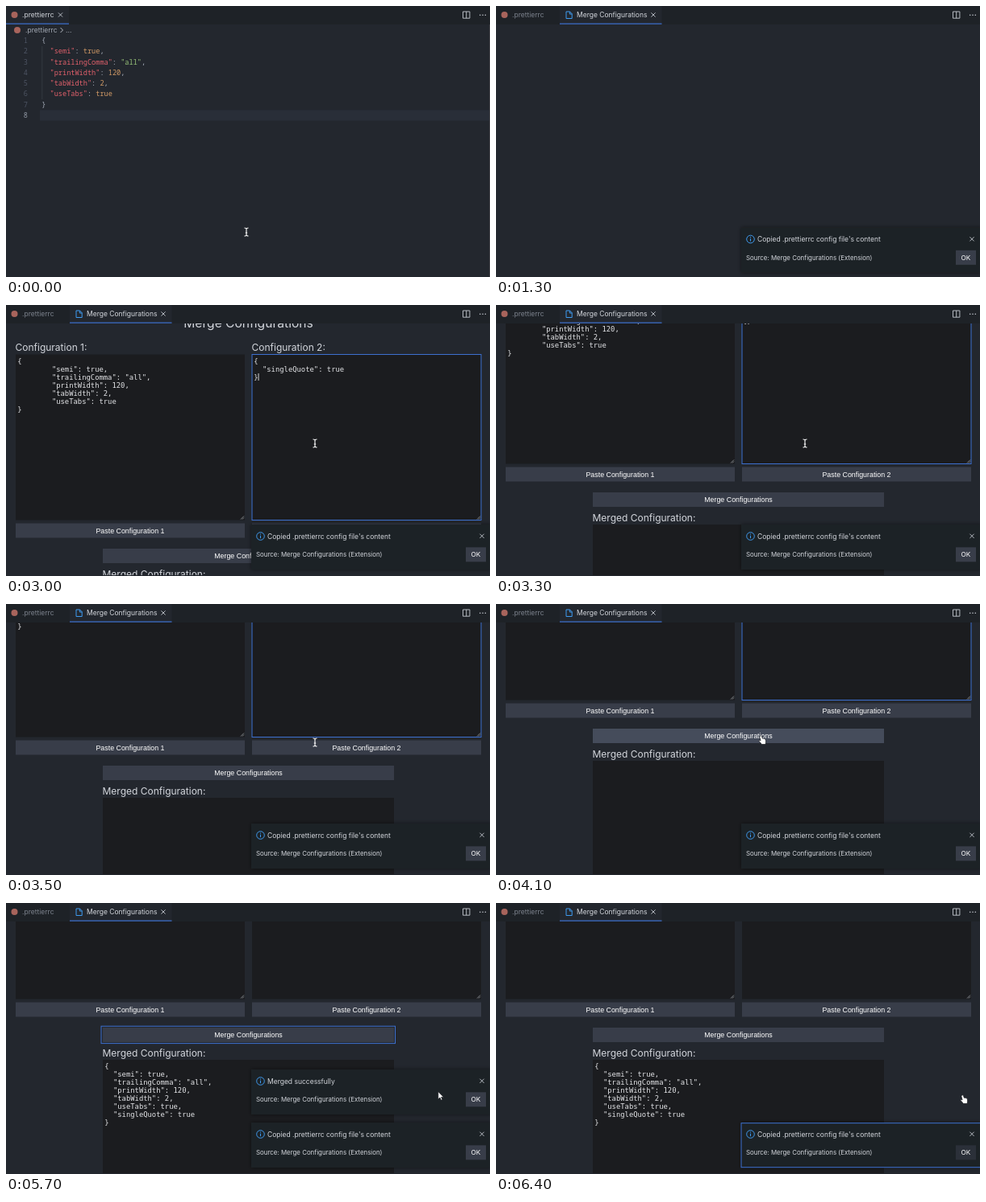
These frames come from a looping animation (600x337 px, 6.5 s). An HTML page:

```html
<!DOCTYPE html>
<html lang="en">
<head>
<meta charset="utf-8">
<title>Merge Configurations</title>
<style>
html, body { margin: 0; width: 100%; height: 100%; overflow: hidden; background: #23272e; }
svg { display: block; width: 100%; height: 100%; }
text { white-space: pre; font: 8.5px Inter, sans-serif; fill: #d3d6dc; }
.code { font: 500 8.6px "Noto Sans Mono", monospace; fill: #abb2bf; }
.area { font: 8.85px "DejaVu Sans Mono", monospace; fill: #e4e5e8; }
.button { font: 8.85px "Liberation Sans", Arial, sans-serif; fill: #fff; text-anchor: middle; }
.label { font-size: 12px; }
.heading { font-size: 15.6px; text-anchor: middle; }
.source { font-size: 7.9px; }
.ok { font-size: 8.2px; fill: #fff; text-anchor: middle; }
.line { fill: none; stroke: #c5c9d1; stroke-width: .9; }
.blue { fill: none; stroke: #3f9bf0; stroke-width: 1; }
</style>
</head>
<body>
<svg id="stage" viewBox="0 0 600 337" preserveAspectRatio="none">
  <defs>
    <clipPath id="view"><rect y="23" width="600" height="313"/></clipPath>
    <filter id="shadow" x="-10%" y="-30%" width="120%" height="160%">
      <feDropShadow dx="0" dy="0" stdDeviation="2.5" flood-color="#000" flood-opacity=".5"/>
    </filter>
  </defs>
</svg>
<script>
const NS = "http://www.w3.org/2000/svg";
const LOOP = 6500, STEP = 100;
const BG = "#23272e", DARK = "#1e2227", FIELD = "#1b1c1f", BUTTON = "#383d49", HOVER = "#454c5b", FOCUS = "#3d70d0";
const stage = document.getElementById("stage");

function add(parent, tag, attrs = {}, content) {
  const node = document.createElementNS(NS, tag);
  for (const key in attrs) node.setAttribute(key, attrs[key]);
  if (content !== undefined) node.textContent = content;
  parent.append(node);
  return node;
}
const group = (parent, attrs) => add(parent, "g", attrs);
const rect = (parent, x, y, width, height, fill, more) => add(parent, "rect", { x, y, width, height, fill, ...more });
const text = (parent, x, y, content, cls = "", more) => add(parent, "text", { x, y, class: cls, ...more }, content);
const path = (parent, d, cls = "line", more) => add(parent, "path", { d, class: cls, ...more });
const cross = (parent, x, y) => path(parent, `M${x - 2.6} ${y - 2.6}l5.2 5.2m0 -5.2l-5.2 5.2`);
const badge = (parent, x, y) => add(parent, "circle", { cx: x, cy: y, r: 4, fill: "#a8645c" });
const show = (node, on) => node.setAttribute("visibility", on ? "inherit" : "hidden");
const place = (node, x, y) => node.setAttribute("transform", `translate(${x} ${y})`);

// Piecewise linear value from rows of [time, ...values]
function track(rows, t) {
  const i = rows.findLastIndex(row => row[0] <= t);
  const a = rows[Math.max(i, 0)], b = rows[i + 1] || a;
  const k = b === a ? 0 : (t - a[0]) / (b[0] - a[0]);
  return a.slice(1).map((v, j) => typeof v === "number" ? v + (b[j + 1] - v) * k : v);
}

// Editor
const settings = [["semi", "true"], ["trailingComma", '"all"'], ["printWidth", "120"], ["tabWidth", "2"], ["useTabs", "true"]];
const editor = group(stage);
rect(editor, 0, 0, 600, 337, BG);
rect(editor, 42, 129.5, 558, 13, "#292e38");
rect(editor, 44.5, 50, .7, 66, "#3b4049");
rect(editor, 599, 23, 1, 314, "#3a3b40");
badge(editor, 14, 30);
text(editor, 24, 33.1, ".prettierrc", "", { style: "fill:#a3a9b4" });
path(editor, "M67.5 27l3 3l-3 3");
text(editor, 74, 33.1, "...", "", { style: "fill:#a3a9b4" });
const lineY = i => 46.2 + i * 13.25;
for (let i = 0; i < 8; i++)
  text(editor, 27, lineY(i), i + 1, "code", { "text-anchor": "end", style: `fill:${i === 7 ? "#9299a5" : "#4d5463"}` });
text(editor, 44.2, lineY(0), "{", "code");
text(editor, 44.2, lineY(6), "}", "code");
settings.forEach(([key, value], i) => {
  const row = text(editor, 44.2, lineY(i + 1), "", "code");
  const span = (content, fill) => add(row, "tspan", { style: `fill:${fill}` }, content);
  span(`  "${key}"`, "#e0606b");
  span(": ", "#abb2bf");
  span(value, value[0] === '"' ? "#98c379" : "#d19a66");
  if (i < 4) span(",", "#abb2bf");
});

// Web view
const view = group(stage, { "clip-path": "url(#view)" });
rect(view, 0, 23, 600, 314, BG);
const page = group(view);
text(page, 300.5, 27.5, "Merge Configurations", "heading");

function field(x, y, w, h) {
  const box = rect(page, x, y, w, h, FIELD);
  path(page, `M${x + w - 5} ${y + h - 1}l4 -4m-2 4l2 -2`, "line", { style: "stroke-width:.6" });
  return box;
}
function button(x, y, w, label) {
  const box = rect(page, x, y, w, 18, BUTTON);
  text(page, x + w / 2, y + 12.2, label, "button");
  return box;
}
function lines(x, y, rows) {
  const block = group(page);
  rows.forEach((row, i) => text(block, x, y + i * 10, row, "area"));
  return block;
}
const json = (indent, entries) => ["{",
  ...entries.map(([k, v], i) => `${indent}"${k}": ${v}${i < entries.length - 1 ? "," : ""}`), "}"];

text(page, 11.5, 56.6, "Configuration 1:", "label");
text(page, 304.5, 56.6, "Configuration 2:", "label");
field(12, 61.5, 284, 206);
const second = field(305, 61.5, 284, 206);
const pasteOne = button(12, 271.5, 284, "Paste Configuration 1");
button(305, 271.5, 284, "Paste Configuration 2");
const mergeRing = rect(page, 118, 301.2, 364.5, 21.4, "none", { stroke: FOCUS });
const mergeButton = button(120, 303, 361, "Merge Configurations");
text(page, 119.5, 338.8, "Merged Configuration:", "label");
field(120, 343, 361, 200);
const first = lines(14.3, 72.8, json(" ".repeat(8), settings));
const typed = lines(307.3, 72.8, ["", "", ""]);
const caret = rect(page, 0, 0, .8, 9, "#fff");
const merged = lines(122.3, 354.3, json("  ", [...settings, ["singleQuote", "true"]]));
rect(view, 0, 336, 600, 1, "#1a1a20");

// Tabs
const bar = group(stage);
rect(bar, 0, 0, 600, 23, DARK);
function tab(x, w) {
  const node = group(bar);
  rect(node, x, 0, w, 23, BG);
  rect(node, x, 21.5, w, 1.2, FOCUS);
  cross(node, x + w - 10.5, 11);
  return node;
}
const fileTab = tab(0, 78), viewTab = tab(79, 126.5);
badge(bar, 10.5, 11);
const fileName = text(bar, 20, 14.1, ".prettierrc");
path(viewTab, "M87 7h4.5l2.7 2.7v5.8h-7.2zM91.3 7v3h2.9", "blue");
text(viewTab, 100, 14.1, "Merge Configurations");
path(bar, "M566.5 7h8.4v8.2h-8.4zM570.7 7v8.2");
for (const x of [587.7, 591, 594.3]) add(bar, "circle", { cx: x, cy: 11.3, r: .8, fill: "#c5c9d1" });

// Command palette
const palette = group(stage, { filter: "url(#shadow)" });
rect(palette, 114, 3, 372, 165, DARK, { rx: 2 });
rect(palette, 118, 7, 364, 16, FIELD, { stroke: FOCUS, "stroke-width": .8 });
rect(palette, 114, 27, 372, 15, "#2c313a");
const query = text(palette, 122, 18.2, "");
["Copy Config File Content", "Open"].forEach((name, i) =>
  text(palette, 122, 37.5 + i * 15, `Merge Configurations: ${name}`));

// Notifications
function toast(y, message) {
  const node = group(stage);
  const frame = rect(node, 304, y, 298, 56, DARK, { filter: "url(#shadow)" });
  add(node, "circle", { cx: 315.5, cy: y + 14.5, r: 4.8, class: "blue" });
  path(node, `M315.5 ${y + 13.7}v3.4m0 -5.6v1.1`, "blue");
  text(node, 324, y + 17.6, message);
  cross(node, 590, y + 14.3);
  text(node, 310, y + 40.2, "Source: Merge Configurations (Extension)", "source");
  const ok = rect(node, 570, y + 28.3, 25, 18, BUTTON);
  text(node, 582.5, y + 40.4, "OK", "ok");
  return { node, frame, ok };
}
const copied = toast(273, "Copied .prettierrc config file's content");
const success = toast(207, "Merged successfully");
const ring = rect(copied.node, 304, 273.7, 297, 55, "none", { stroke: FOCUS });

// Pointers, centred on their own origin
const outline = { style: "fill:#fff;stroke:#14161a;stroke-width:.7;stroke-linejoin:round" };
const pointers = {
  beam: path(stage, "M-2.5 -5q2.5 0 2.5 1.5q0 -1.5 2.5 -1.5M0 -3.5v7M-2.5 5q2.5 0 2.5 -1.5q0 1.5 2.5 1.5M-1.2 1h2.4", "",
    { style: "fill:none;stroke:#fff;stroke-width:1.1" }),
  arrow: path(stage, "M-3 -5v9.5l2.2 -2l1.5 3.3l1.6 -.7l-1.5 -3.2h3z", "", outline),
  hand: path(stage, "M-2.2 -5q1.3 -.6 1.7 .7l.8 2.6q.8 -.6 1.4 .2q.9 -.5 1.4 .4q1 -.2 1.2 .9l.3 2.3l-.5 3.4h-4.6l-3.6 -4.2q-.2 -1.3 1.2 -.9l1 .6l-1.2 -4.4q-.2 -1 .9 -1.6z", "", outline)
};
const pointerPath = [
  [0, 298, 281, "beam"], [900, 298, 281, ""], [1600, 298, 281, "arrow"], [1800, 160, 281, "hand"],
  [2000, 160, 281, "arrow"], [2200, 383, 172, "beam"], [3600, 383, 172, "arrow"], [4000, 330, 169, "hand"],
  [4300, 330, 169, "hand"], [4700, 342, 170, "hand"], [5000, 342, 170, "arrow"],
  [5600, 525, 238, "arrow"], [6000, 580, 244, "hand"], [6500, 580, 244, "hand"]
];
const pagePath = [
  [0, 8], [2900, 8], [3000, 0], [3100, -16], [3200, -42], [3300, -70],
  [3400, -91], [3500, -102], [3600, -128], [3700, -148]
];
const snippet = '{\n  "singleQuote": true\n}';
const command = ">merge configurations";

function drawTyping(t) {
  const count = Math.round(track([[2200, 0], [2900, snippet.length]], t)[0]);
  const rows = snippet.slice(0, count).split("\n");
  [...typed.children].forEach((node, i) => node.textContent = rows[i] || "");
  const last = rows.length - 1;
  place(caret, 307.3 + rows[last].length * 5.33, 65 + last * 10);
  show(caret, t >= 2200 && t < 4300);
}

function render(time) {
  const t = Math.floor(time / STEP) * STEP;
  const opened = t >= 1000, focusedSecond = t >= 2200 && t < 4300, focusedMerge = t >= 4300 && t < 6300;
  show(editor, !opened);
  show(view, opened);
  show(page, t >= 1600);
  show(fileTab, !opened);
  show(viewTab, opened);
  fileName.style.fill = opened ? "#7d838e" : "#d3d6dc";

  show(palette, t >= 200 && t < 900);
  query.textContent = command.slice(0, Math.round(track([[200, 1], [800, command.length]], t)[0]));

  place(page, 0, track(pagePath, t)[0]);
  show(first, t >= 1900);
  drawTyping(t);
  second.setAttribute("stroke", focusedSecond ? FOCUS : "none");
  show(mergeRing, focusedMerge);
  show(merged, t >= 4400);
  pasteOne.setAttribute("fill", t >= 1800 && t < 2100 ? HOVER : BUTTON);
  mergeButton.setAttribute("fill", t >= 4000 && t < 5100 ? HOVER : BUTTON);

  show(copied.node, t >= 1200);
  place(copied.node, 0, track([[1200, 14], [1300, 2.5], [1400, 0]], t)[0]);
  show(ring, t >= 6400);
  copied.ok.setAttribute("fill", t >= 6400 ? "#2b3039" : BUTTON);
  show(success.node, t >= 4500 && t < 6400);
  place(success.node, 0, track([[4500, 14], [4600, 2.5], [4700, 0]], t)[0]);
  success.ok.setAttribute("fill", t >= 6000 ? HOVER : BUTTON);

  const [x, y, kind] = track(pointerPath, t);
  for (const name in pointers) {
    show(pointers[name], name === kind);
    place(pointers[name], x, y);
  }
}

const start = performance.now();
function tick() {
  render((performance.now() - start) % LOOP);
  requestAnimationFrame(tick);
}
tick();
</script>
</body>
</html>
```
